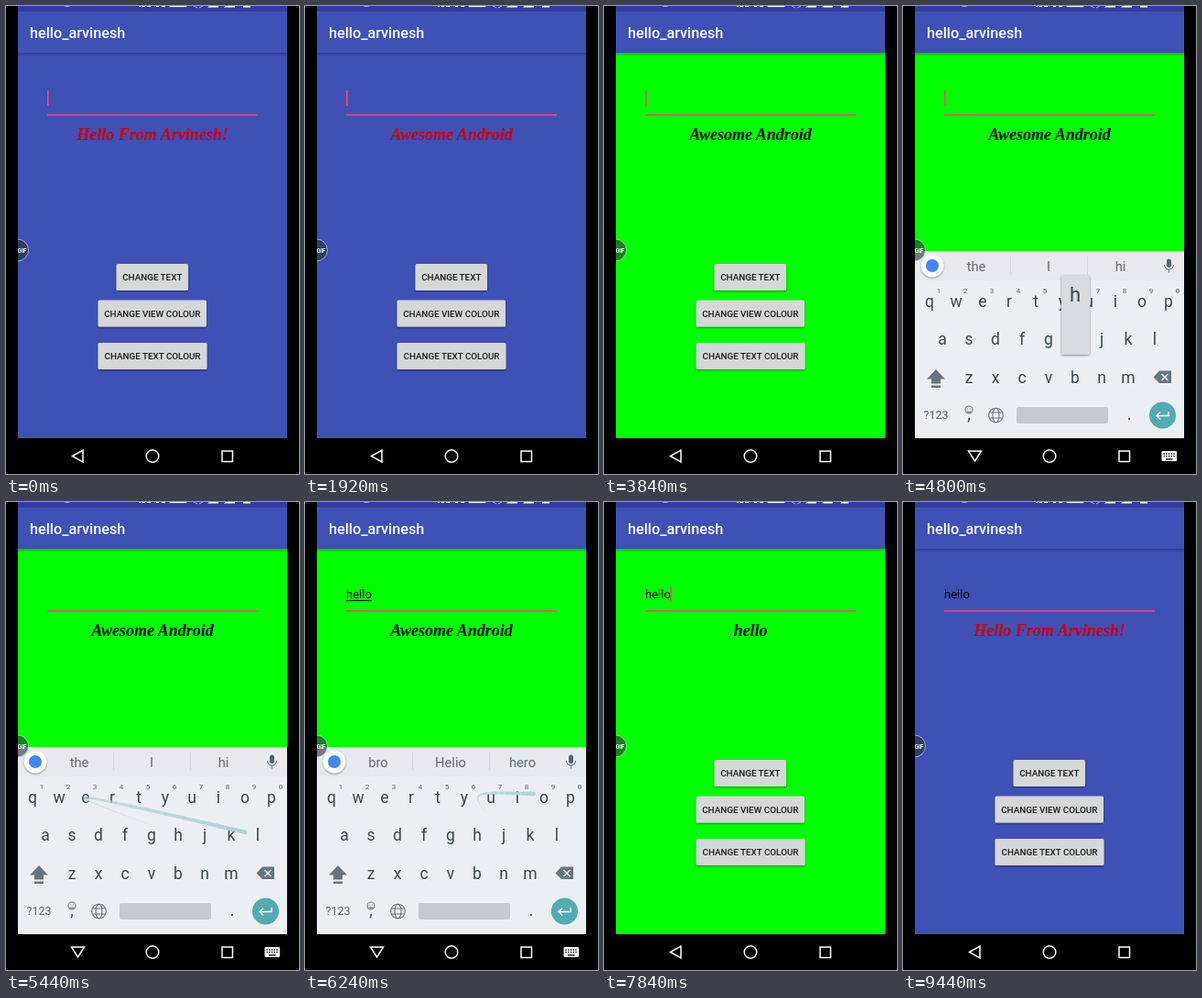
An HTML page for the animation above (9.6 s loop, 320 by 510 pixels).

```html
<!DOCTYPE html>
<html lang="en">
<head>
<meta charset="utf-8">
<title>hello_arvinesh</title>
<style>
  html, body { margin: 0; width: 100%; height: 100%; overflow: hidden; background: #000; }
  svg { display: block; width: 100vw; height: 100vh; font-family: Roboto, sans-serif; }
  .mid { text-anchor: middle; }
  .caps { font-size: 9.85px; font-weight: 500; fill: #1b1b1b; }
  .script { font: italic bold 18px "Liberation Serif", serif; }
  .key { font-size: 17.5px; fill: #37474f; }
  .hint { font-size: 8px; fill: #56646c; }
  .word { font-size: 14.7px; fill: #5f6c74; }
  .line { fill: none; stroke: #66757d; stroke-width: 1.1; }
  .nav { fill: none; stroke: #fff; stroke-width: 1.5; }
</style>
</head>
<body>
<svg viewBox="0 0 320 510" preserveAspectRatio="none">
  <defs>
    <linearGradient id="shade" x2="0" y2="1">
      <stop stop-opacity=".25"/><stop offset="1" stop-opacity="0"/>
    </linearGradient>
    <filter id="drop" x="-10%" y="-20%" width="120%" height="150%">
      <feDropShadow dx="0" dy="1" stdDeviation=".9" flood-opacity=".45"/>
    </filter>
    <clipPath id="screen"><path d="M13 0H307V471H13z"/></clipPath>
  </defs>
  <rect width="320" height="510"/>
  <g clip-path="url(#screen)">
    <rect id="view" x="13" y="51" width="294" height="420"/>
    <rect x="13" y="51" width="294" height="4" fill="url(#shade)"/>
    <path fill="#3f51b5" d="M13 6H307V51H13z"/>
    <path fill="#303f9f" d="M13 0H307V6H13z"/>
    <g fill="#fff">
      <path d="M145 0h2v1h-2zM149 0h3v1h-3zM154 0h4v1h-4zM164 0h3v1h-3zM170 0h4v1h-4zM220 1.500l1.500-1.500H232V1.500zM238 1.500l1.500-1.500H250V1.500zM259 0h8v1.500h-8z"/>
      <path d="M179 0V.6H197V0" stroke="#fff"/>
      <path d="M63-1.500a4 2 0 0 0 8 0M205 0l4 2M215 0l-4 2" fill="none" stroke="#a9b1d8"/>
    </g>
    <text x="26" y="35" font-size="16.2" font-weight="500" fill="#fff">hello_arvinesh</text>

    <path fill="#ff4081" d="M45 118H275v1.600H45z"/>
    <text id="typed" x="45" y="105" font-size="13">hello</text>
    <path id="compose" d="M45 107.500H73" stroke="#000"/>
    <rect id="caret" y="92" width="1.600" height="17" fill="#ff4081"/>
    <text id="label" class="mid script" x="160" y="146"></text>
    <g id="buttons"></g>

    <g id="keyboard">
      <path fill="#eceff1" d="M13 267H307V471H13z"/>
      <path fill="#e6eaed" d="M13 267H307V299H13z"/>
      <path d="M117.500 273V293M201.500 273V293" stroke="#d3d9dc"/>
      <circle cx="32" cy="283" r="12.300" fill="#fff" filter="url(#drop)"/>
      <circle cx="32" cy="283" r="7" fill="#4285f4"/>
      <g id="words"></g>
      <rect x="288" y="275.500" width="5" height="9.500" rx="2.500" fill="#56646c"/>
      <path class="line" d="M285.500 282a5 5 0 0 0 10 0M290.500 287v3.500"/>
      <g id="keys"></g>
      <path fill="#66757d" d="M36 396L46 406.500H41V411.500H31V406.500H26zM31 413.500H41V416H31zM273.500 404.500L280 397.500H293V411H280z"/>
      <path d="M282.500 401l7 7m0-7l-7 7" stroke="#eceff1" stroke-width="1.500"/>
      <text class="mid" x="36" y="450" font-size="12.500" fill="#56646c">?123</text>
      <circle class="line" cx="72" cy="440" r="4"/>
      <path class="line" d="M70 441.500q2 2 4 0M70.500 438.500v1M73.500 438.500v1"/>
      <text class="mid key" x="72" y="451" font-size="15">,</text>
      <g class="line">
        <circle cx="101.500" cy="446" r="7.800"/><ellipse cx="101.500" cy="446" rx="3.500" ry="7.800"/>
        <path d="M94.500 443H108.500M94.500 449H108.500"/>
      </g>
      <rect x="124" y="437" width="100" height="18" rx="2" fill="#c6cacd"/>
      <text class="mid key" x="247" y="451">.</text>
      <circle cx="283.500" cy="446" r="14.500" fill="#52abb0"/>
      <path d="M290 442v4.500H277m4-4l-4 4l4 4" fill="none" stroke="#fff" stroke-width="1.500"/>
      <g id="trail" stroke="#b1d3d8" stroke-linecap="round"></g>
      <g id="popup">
        <rect x="173" y="293" width="31" height="87" rx="3" fill="#d9dcde" filter="url(#drop)"/>
        <text class="mid" x="188" y="322" font-size="22" fill="#37474f">h</text>
      </g>
    </g>
    <circle cx="12.500" cy="266" r="12" fill="#203033" fill-opacity=".6" stroke="#dde" stroke-opacity=".65"/>
    <text x="12.500" y="268.500" font-size="6.500" font-weight="700" fill="#fff">GIF</text>
  </g>
  <g class="nav">
    <path id="back" d="M72.500 490.500L84 484V497z"/>
    <path id="down" d="M71.500 485H85.500L78.500 496z"/>
    <circle cx="160" cy="490.500" r="6.800"/>
    <path d="M236 485H247.500V496.500H236z"/>
  </g>
  <g id="switcher">
    <rect x="282.500" y="485" width="16.500" height="11" rx="1.200" fill="#fff"/>
    <path d="M284.500 488H297M284.500 490.500H297" stroke="#000" stroke-width="1.300" stroke-dasharray="1.300 1.400"/>
    <path d="M287 493.800H294.500" stroke="#000" stroke-width="1.300"/>
  </g>
</svg>
<script>
const LOOP = 9600, STEP = 160, TRAIL = 480;
const $ = id => document.getElementById(id);
const set = (el, attrs) => { for (const k in attrs) el.setAttribute(k, attrs[k]); return el; };
const add = (parent, tag, attrs, text = "") => {
  const el = set(document.createElementNS("http://www.w3.org/2000/svg", tag), attrs);
  el.textContent = text;
  return parent.appendChild(el);
};
const show = (id, on) => $(id).style.display = on ? "" : "none";
const within = (t, a, b) => t >= a && t < b;
const ramp = (t, a, b) => Math.min(1, Math.max(0, (t - a) / (b - a)));

// label, x, y, width, press times
const buttons = [
  ["CHANGE TEXT", 120.5, 281, 78.5, [1120, 7360]],
  ["CHANGE VIEW COLOUR", 100.5, 320.5, 118.5, [2080]],
  ["CHANGE TEXT COLOUR", 100.5, 367, 119, [3040]]
].map(([text, x, y, width, presses]) => {
  const box = { x, y, width, height: 29, rx: 1.6 };
  add($("buttons"), "rect", { ...box, fill: "#d6d7d7", filter: "url(#drop)" });
  const tint = add($("buttons"), "rect", box);
  add($("buttons"), "text", { class: "mid caps", x: x + width / 2, y: y + 18.2 }, text);
  return { tint, presses };
});

[["qwertyuiop", 29, 328], ["asdfghjkl", 43, 369], ["zxcvbnm", 72, 411]].forEach(([row, x0, y], r) =>
  [...row].forEach((c, i) => {
    const x = x0 + i * 29;
    add($("keys"), "text", { class: "mid key", x, y }, c);
    if (!r) add($("keys"), "text", { class: "mid hint", x: x + 10, y: 313 }, (i + 1) % 10);
  }));

const words = [80, 159, 237.5].map(x => add($("words"), "text", { class: "mid word", x, y: 289 }));
const trail = Array.from({ length: 24 }, () => add($("trail"), "line", {}));

// finger path of the glide, evenly spaced in time and smoothed
const GLIDE = [4960, 6240];
const path = [[188, 363], [87, 322], [275, 363], [215, 350], [190, 320], [250, 318]];
function finger(t) {
  const last = path.length - 1, u = ramp(t, ...GLIDE) * last;
  const i = Math.min(last - 1, Math.floor(u)), f = u - i;
  const p = k => path[Math.min(last, Math.max(0, i + k))];
  return [0, 1].map(d => {
    const a = p(-1)[d], b = p(0)[d], c = p(1)[d], e = p(2)[d];
    return b + f / 2 * (c - a + f * (2 * a - 5 * b + 4 * c - e + f * (3 * (b - c) + e - a)));
  });
}

function draw(t) {
  const green = within(t, 2240, 8480), black = within(t, 3200, 8480);
  const typed = t >= 6240, composing = within(t, 6240, 6720);
  const keysUp = within(t, 4480, 7040);

  set($("view"), { fill: green ? "#0f0" : "#3f51b5" });
  set($("label"), { fill: black ? "#000" : "#d00000" });
  $("label").textContent = t < 1280 || t >= 8480 ? "Hello From Arvinesh!"
    : t < 7520 ? "Awesome Android" : "hello";

  show("typed", typed);
  show("compose", composing);
  show("caret", Math.floor((t - 280) / 500) % 2 && !composing);
  set($("caret"), { x: typed ? 72.3 : 45 });

  for (const { tint, presses } of buttons) {
    const glow = presses.map(s => t < s ? 0 : 1 - ramp(t, s, s + 320));
    set(tint, { "fill-opacity": 0.15 * Math.max(...glow) });
  }

  const drop = 204 * (1 - ramp(t, 4320, 4640) + ramp(t, 6720, 7040));
  set($("keyboard"), { transform: `translate(0 ${drop})` });
  show("keyboard", keysUp);
  show("down", keysUp);
  show("switcher", keysUp);
  show("back", !keysUp);
  show("popup", t === 4800);
  const list = t < 5600 ? ["the", "I", "hi"] : ["bro", "Helio", "hero"];
  words.forEach((w, i) => w.textContent = list[i]);

  show("trail", t > GLIDE[0] && t <= GLIDE[1]);
  trail.forEach((seg, i) => {
    const gap = TRAIL / trail.length, fade = 1 - i / trail.length;
    const [x1, y1] = finger(t - i * gap), [x2, y2] = finger(t - (i + 1) * gap);
    set(seg, { x1, y1, x2, y2, "stroke-width": 4.5 * fade, opacity: fade });
  });
}

function tick() {
  draw(Math.floor(performance.now() % LOOP / STEP) * STEP);
  requestAnimationFrame(tick);
}
tick();
</script>
</body>
</html>
```
